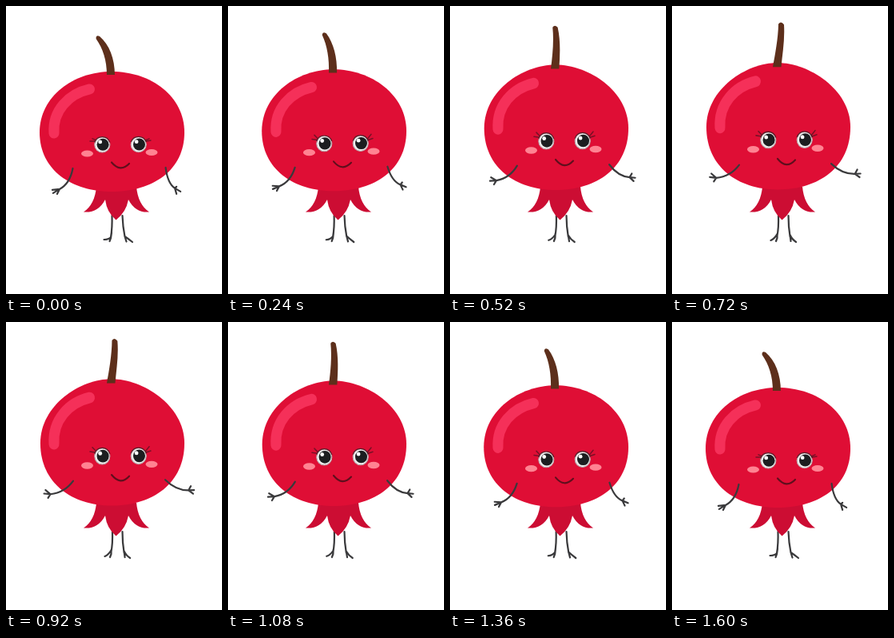
These frames come from a looping animation (270 px wide and 360 px high, 1680 ms). An HTML page:

```html
<!DOCTYPE html>
<html lang="en">
<head>
<meta charset="utf-8">
<title>Dancing berry</title>
<style>
  html, body { margin: 0; width: 100%; height: 100%; overflow: hidden; background: #fff; }
  svg { display: block; width: 100vw; height: 100vh; }
  .line { fill: none; stroke: #3a3a3c; stroke-width: 2.2; stroke-linecap: round; stroke-linejoin: round; }
</style>
</head>
<body>
<svg viewBox="0 0 270 360">
  <defs>
    <g id="eye">
      <circle r="9.600" fill="#ececec" stroke="#b9a4a8"/>
      <circle cx=".8" cy="-.2" r="7.500" fill="#1c1e20"/>
      <circle cx="-2.600" cy="-3.500" r="2.400" fill="#fff"/>
      <path d="M-9.500 -3A10 10 0 0 1 9.500 -3" fill="none" stroke="#5c1a26" stroke-width="1.200"/>
    </g>
  </defs>
  <path id="legs" class="line"/>
  <path fill="#cc0d33" d="M113 226Q111 248 97 257.500Q115 259 124 242Q126 258 137.500 267.500Q150 258 153 242Q162 259 179 257.500Q165 248 163 226Z"/>
  <g id="berry">
    <path id="body" fill="#df0e35"/>
    <path fill="none" stroke="#f53059" stroke-width="13" stroke-linecap="round" d="M60 159C58 131 78 110 104.500 104"/>
    <ellipse cx="101.500" cy="184.500" rx="7.500" ry="4" fill="#ff8392"/>
    <ellipse cx="182" cy="183" rx="7.500" ry="4" fill="#ff8392"/>
    <path id="lashes" fill="none" stroke="#7a1026" stroke-width="1.500" stroke-linecap="round"/>
    <use href="#eye" x="120.300" y="173.500"/>
    <use href="#eye" x="165.700" y="173.200"/>
    <path fill="none" stroke="#5f0f1d" stroke-width="2.100" stroke-linecap="round" d="M132 195.500Q143 208.500 154 197"/>
  </g>
  <path id="stem" fill="#5d2f1b"/>
  <path id="arms" class="line"/>
</svg>
<script>
const LOOP = 1680, STEP = 40, PEAK = 800;
const el = id => document.getElementById(id);

// Each part bends between its low pose and its stretched pose.
const poses = {
  body: [
    'M132 82C182 82 223 113 223 158C223 205 184 232 132 232C82 232 42 205 42 158C42 113 84 82 132 82Z',
    'M132 82C170 82 223 113 223 158C223 205 184 232 132 232C82 232 43 205 43 158C43 113 93 82 132 82Z'],
  stem: [
    'M126 86C126 68 121 53 112.500 41Q112 36 117 38C129 48 136 66 136 86Z',
    'M126 76C129 60 133 40 133.500 22Q137 18 140.500 23C141.500 42 138 60 136.500 76Z'],
  arms: [
    'M83.500 203Q80 222 67 229M58 230L67 229L59 234M67 229L64 235' +
    'M199.500 202Q202 222 211 228M213 226L211 228L218 232M211 228L213 235',
    'M84 198.500Q73 213 55 214.500M49 209L55 214.500L47 213.500M55 214.500L52 219' +
    'M199 197Q213 210 229 209.500M232 204L229 209.500L236 209M229 209.500L235 213.500'],
  legs: [
    'M132.500 262Q133 277 131 289M131 289Q128 292 122.500 292M132 283L131 290L129.500 294' +
    'M145.500 262Q146 276 148.500 288M148.500 288L150.500 294.500M148.500 288Q153 291 158 295',
    'M133 262Q133.500 277 131.500 287M131.500 285Q128 291 123.500 293M131.500 285L131.500 290L130 294' +
    'M145.500 262Q145.500 276 147.500 288M147.500 286L148.500 294M147.500 286Q150 292 155 295']
};
const lashes = [
  'M108 166L113 168M105 169L112 169M174 168L179 166M175 169L181 168',
  'M108 163L113 168M105 168L112 169M174 168L179 162M175 169L181 167'
];

function morph([from, to], p) {
  const target = to.match(/[\d.]+/g);
  let i = 0;
  return from.replace(/[\d.]+/g, n => (+n + (target[i++] - n) * p).toFixed(2));
}

function draw(now) {
  const t = Math.min(Math.floor(now % LOOP / STEP) * STEP, LOOP - 2 * STEP);
  const p = (1 + Math.cos(2 * Math.PI * (t - PEAK) / LOOP)) / 2;
  for (const id in poses) el(id).setAttribute('d', morph(poses[id], p));
  el('lashes').setAttribute('d', morph(lashes, Math.min(1, p * 4)));
  el('berry').setAttribute('transform', `translate(0 276) scale(1 ${1 + .058 * p}) translate(0 -276)`);
}

const start = performance.now();
(function tick() {
  draw(performance.now() - start);
  requestAnimationFrame(tick);
})();
</script>
</body>
</html>
```
